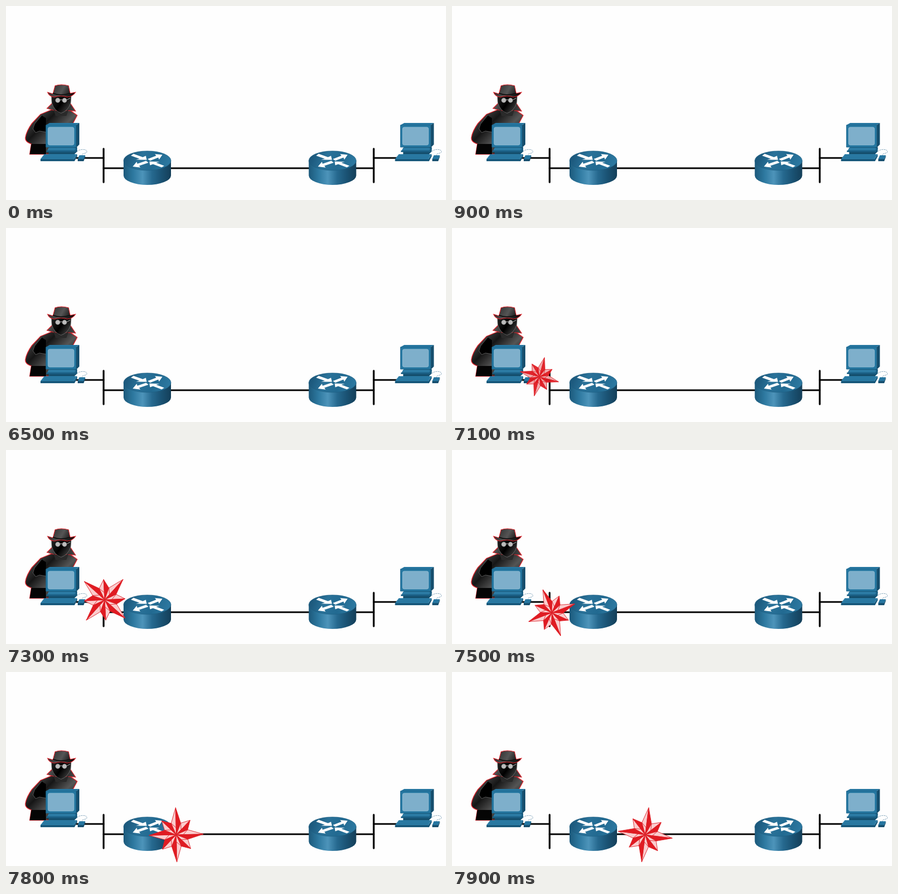
An HTML page with a canvas for the animation above (8000 ms loop, 816 by 360 pixels).

```html
<!DOCTYPE html>
<html lang="zh">
<head>
<meta charset="utf-8">
<style>
  html, body { margin: 0; width: 100%; height: 100%; overflow: hidden; background: #fefefe; }
  canvas { display: block; }
</style>
</head>
<body>
<canvas id="stage" width="816" height="360"></canvas>
<script>
const ctx = document.getElementById('stage').getContext('2d');
const LOOP = 8000, STEP = 100;
const LINES = ['终端用户工作站最容易遭受的是病毒、蠕虫', '和特洛伊木马攻击。'];

// time, x, y, radius, degrees, opacity
const KEYS = [
  [6900, 140, 274, 34, -12, .4],
  [7100, 162, 276, 37, 15, .95],
  [7300, 183, 278, 51, 42, 1],
  [7500, 185, 302, 46, 69, 1],
  [7700, 273, 302, 50, 80, 1],
  [8000, 401, 302, 51, 106, 1]
];

function shape(fill, path, stroke, width = 1) {
  const p = new Path2D(path);
  if (fill) { ctx.fillStyle = fill; ctx.fill(p); }
  if (stroke) { ctx.strokeStyle = stroke; ctx.lineWidth = width; ctx.stroke(p); }
}

function gradient(x0, y0, x1, y1, ...colors) {
  const g = ctx.createLinearGradient(x0, y0, x1, y1);
  colors.forEach((c, i) => g.addColorStop(i / (colors.length - 1), c));
  return g;
}

function at(x, y, draw) {
  ctx.save();
  ctx.translate(x, y);
  draw();
  ctx.restore();
}

function wires() {
  ctx.lineCap = 'round';
  shape(null, 'M130 282H181M181 301H682M682 282H728', '#000', 2.8);
  shape(null, 'M181 265V327M682 265V327', '#000', 3.3);
  ctx.lineCap = 'butt';
}

function arrow(x0, y0, x1, y1) {
  const dx = x1 - x0, dy = y1 - y0;
  // the arrows lie on a flattened disc
  const nx = -dy / 4, ny = dx / 16;
  const pt = (k, w) => `${x0 + dx * k + nx * w} ${y0 + dy * k + ny * w}`;
  shape('#fff', 'M' + [pt(0, 1), pt(.6, 1), pt(.5, 2.7), pt(1, 0),
    pt(.7, -2.7), pt(.64, -1), pt(0, -1)].join('L') + 'Z');
}

function router() {
  shape(gradient(-44, 0, 44, 0, '#1c597b', '#2d789f', '#4d94ba', '#26698f', '#1a5273', '#143f59'),
    'M-44 0V27.5A44 17.5 0 0 0 44 27.5V0Z');
  shape(gradient(-35, -14, 35, 14, '#1c597d', '#2a7299', '#226a91', '#2c779f'),
    'M-44 0A44 18 0 0 1 44 0A44 18 0 0 1 -44 0Z', '#1c5b7f', .6);
  arrow(-28, -11, -1, -1.5);
  arrow(3, -1.5, 28, -11);
  arrow(29, 11, 4, 1.5);
  arrow(0, 2, -27, 11);
}

function computer() {
  shape('#175677', 'M80 262H132V270L127 275H80Z');
  shape('#2b7aa3', 'M79 263H127L132 266L127 271H75Z');
  shape('#1a5f84', 'M75 268H127L132 262V266L127 271H75Z');
  shape('#15506f', 'M79 271H127V276H79Z');
  shape('#2676a0', 'M74 221L81 217H136L130 221Z');
  shape('#164e6d', 'M130 221L136 217V257L130 263Z');
  shape('#2577a1', 'M74 221H130V262H74Z', '#1b6288', .8);
  shape('#7eafcb', 'M81 225H123Q126 225 126 228V255Q126 258 123 258H81Q78 258 78 255V228Q78 225 81 225Z', '#a0c6da', .7);
  shape('#2b7ca6', 'M71 275H132L126 284H64Z');
  shape('#17587b', 'M64 284H126L132 275V279L127 288H64Z');
  shape(null, 'M71 278H127M69 281H125', '#216c94', .8);
  shape('#2676a0', 'M136 277H147L144 284H133Z');
  shape('#164f6f', 'M133 284H144L147 277V280L144 288H133Z');
  ctx.setLineDash([3, 1]);
  shape(null, 'M132 270C136 265 150 265 150 270C150 275 140 272 141 277', '#6792ad', .8);
  ctx.setLineDash([]);
}

function spy() {
  const red = '#e0222a';
  shape(gradient(45, 205, 105, 265, '#4a4a4a', '#161616', '#555', '#111'),
    'M64 201L86 192L118 193L132 203L124 218L126 275H44L47 256Q35 252 36 244Q38 232 48 218Z', red, 1.3);
  shape('#000', 'M66 203L74 208V234L62 232L55 235L50 228L52 220Z');
  shape(null, 'M66 203L53 219L50 228L55 235L62 232L74 234', '#777', .7);
  shape('#050505', 'M47 256H74V275H44Z');
  shape(gradient(78, 184, 128, 200, '#555', '#222', '#4a4a4a'),
    'M87 179L76 190L90 194H114L129 195L119 180Z', red, 1.2);
  shape('#2a2a2a', 'M88 192L102 201L116 192L112 204H92Z');
  shape(gradient(84, 170, 118, 195, '#222', '#000', '#444'),
    'M84 166H121L120 180Q115 195 102 199Q90 195 85 180Z', '#777', .7);
  shape(gradient(88, 148, 120, 166, '#333', '#555', '#111'),
    'M87 163L91 148Q102 144 116 148L119 162L129 160Q124 168 113 169Q102 165 90 169Q80 168 77 160Z', red, 1.1);
  shape(null, 'M87 162Q102 168 119 162', '#111', 2);
  shape('#bcbcbc', 'M91.7 175a4.3 4.3 0 1 0 8.6 0a4.3 4.3 0 1 0-8.6 0M104.2 175a4.3 4.3 0 1 0 8.6 0a4.3 4.3 0 1 0-8.6 0', '#777', .6);
  shape(null, 'M100 174H104M113 174L119 171', '#bbb', 1);
}

function bubble() {
  ctx.save();
  ctx.shadowColor = 'rgba(0,0,0,.4)';
  ctx.shadowBlur = 4;
  ctx.shadowOffsetX = ctx.shadowOffsetY = 1;
  shape('#fff', 'M238 190H258L257 217Z');
  ctx.beginPath();
  ctx.roundRect(226, 113, 379, 80, 8);
  ctx.fill();
  ctx.restore();
  ctx.strokeStyle = '#1b2f5c';
  ctx.lineWidth = 1.8;
  ctx.stroke();
  ctx.fillStyle = '#1c2f55';
  ctx.font = '300 18.4px "Noto Sans CJK SC", "Noto Sans CJK", sans-serif';
  LINES.forEach((s, i) => ctx.fillText(s, 233.5, 139 + 31 * i));
}

// Faceted ring of points, each split into two coloured halves
function burst(r, ratio, inner, turn, left, right) {
  const pt = (a, d) => `${Math.cos(a) * d} ${Math.sin(a) * d}`;
  for (let i = 0; i < 8; i++) {
    const a = turn + i * Math.PI / 4, tip = pt(a, i % 2 ? r * ratio : r);
    [[-1, left], [1, right]].forEach(([side, color]) =>
      shape(color, `M0 0L${tip}L${pt(a + side * Math.PI / 8, inner)}Z`, '#dd2027', .9));
  }
}

function star(t) {
  const i = KEYS.findIndex(k => k[0] > t), from = KEYS[i - 1], to = KEYS[i];
  const k = (t - from[0]) / (to[0] - from[0]);
  const [, x, y, r, deg, alpha] = from.map((v, j) => v + (to[j] - v) * k);
  const turn = deg * Math.PI / 180;
  const red = '#e01b22', pale = t < 7300 ? '#f1a7a9' : '#fbcccd';
  at(x, y, () => {
    ctx.globalAlpha = alpha;
    ctx.lineJoin = 'bevel';
    burst(r, .74, r * .46, turn, pale, red);
    burst(r * .46, 1, r * .26, turn + Math.PI / 8, red, pale);
  });
}

function draw(t) {
  ctx.fillStyle = '#fefefe';
  ctx.fillRect(0, 0, 816, 360);
  wires();
  spy();
  [0, 657.5].forEach(x => at(x, 0, computer));
  [262, 605.5].forEach(x => at(x, 287, router));
  if (t >= 1100 && t < 6500) bubble();
  if (t >= 6900) star(t);
}

const start = performance.now();
function tick() {
  const t = (performance.now() - start) % LOOP;
  draw(Math.floor(t / STEP) * STEP);
  requestAnimationFrame(tick);
}
tick();
</script>
</body>
</html>
```
